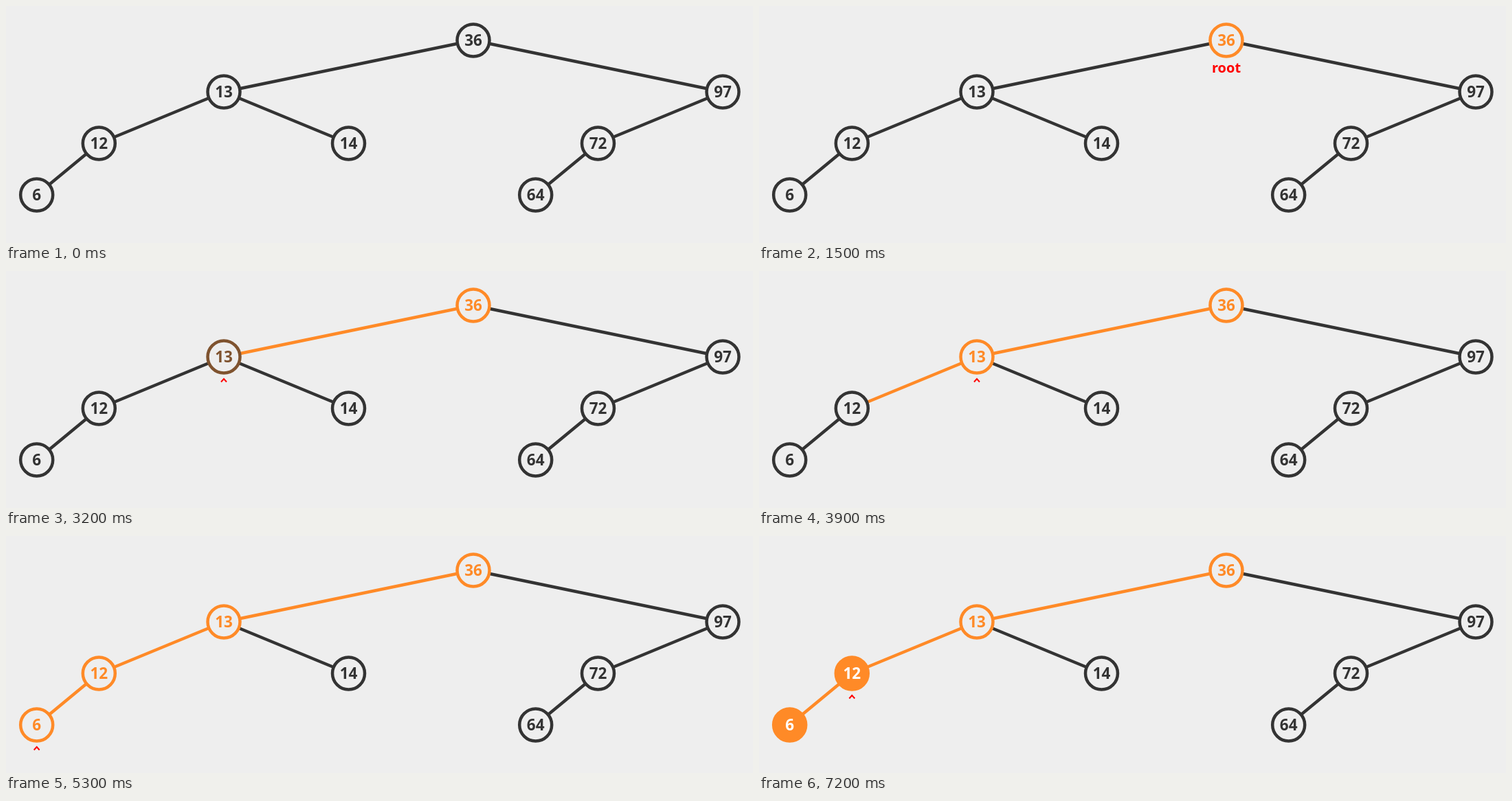
These frames come from a looping animation (1087x345 px, 8 s). An HTML page with a canvas:

```html
<!DOCTYPE html>
<html lang="en">
<head>
<meta charset="utf-8">
<title>Binary search tree traversal</title>
<style>
  html, body { margin: 0; width: 100%; height: 100%; overflow: hidden; background: #eee; }
  canvas { display: block; }
</style>
</head>
<body>
<canvas id="stage" width="1087" height="345"></canvas>
<script>
const ctx = document.getElementById('stage').getContext('2d');
const LOOP = 8000, FADE = 400, RADIUS = 23.5;
const PAPER = [238, 238, 238], INK = [51, 51, 51], ORANGE = [255, 138, 39], WHITE = [255, 255, 255];

// lit: outline turns orange; filled: disc turns solid
const nodes = {
  36: { x: 680, y: 50, lit: 1120 },
  13: { x: 317, y: 125, lit: 3020 },
  97: { x: 1043, y: 125 },
  12: { x: 135.3, y: 200, lit: 3990, filled: 6770 },
  14: { x: 498.5, y: 200 },
  72: { x: 861.5, y: 200 },
  6: { x: 44.7, y: 275, lit: 4910, filled: 5420 },
  64: { x: 770.7, y: 275 }
};
const edges = [
  [36, 13, 2544], [36, 97], [13, 12, 3500], [13, 14],
  [97, 72], [12, 6, 4420], [72, 64]
];
// Where the caret sits from each time on
const caretStops = [[2100, 36], [3020, 13], [3990, 12], [4910, 6], [6770, 12]];

function progress(time, start = Infinity) {
  const p = Math.min(1, Math.max(0, (time - start) / FADE));
  return p < 0.5 ? 4 * p ** 3 : 1 - 4 * (1 - p) ** 3;
}

const mix = (from, to, p) => `rgb(${from.map((c, i) => Math.round(c + (to[i] - c) * p))})`;
const rgb = color => mix(color, color, 0);

function line(points, width, color) {
  ctx.beginPath();
  points.forEach(([x, y]) => ctx.lineTo(x, y));
  ctx.lineWidth = width;
  ctx.strokeStyle = color;
  ctx.stroke();
}

function label(text, x, baseline, size, color) {
  ctx.font = `bold ${size}px "Open Sans", "Noto Sans", sans-serif`;
  ctx.fillStyle = color;
  ctx.fillText(text, x, baseline);
}

function drawEdge(time, [from, to, start]) {
  const a = nodes[from], b = nodes[to];
  const length = Math.hypot(b.x - a.x, b.y - a.y);
  const along = d => [a.x + (b.x - a.x) * d / length, a.y + (b.y - a.y) * d / length];
  const p = progress(time, start);
  line([along(RADIUS), along(length - RADIUS)], 4.5, rgb(p === 1 ? ORANGE : INK));
  if (p > 0 && p < 1) {
    line([along(RADIUS), along(RADIUS + (length - 2 * RADIUS) * p)], 15, rgb(ORANGE));
  }
}

function drawNode(time, value, { x, y, lit, filled }) {
  const litness = progress(time, lit), fullness = progress(time, filled);
  ctx.beginPath();
  ctx.arc(x, y, RADIUS, 0, 2 * Math.PI);
  ctx.fillStyle = mix(PAPER, ORANGE, fullness);
  ctx.fill();
  ctx.lineWidth = 4.5;
  ctx.strokeStyle = mix(INK, ORANGE, litness);
  ctx.stroke();
  label(value, x, y + 8, 22.5, fullness ? mix(ORANGE, WHITE, fullness) : mix(INK, ORANGE, litness));
}

function drawMarker(time) {
  if (time >= 1120 && time < 2100) label('root', 680, 97, 20, '#f00');
  const stop = caretStops.filter(([start]) => time >= start).pop();
  if (!stop) return;
  const { x, y } = nodes[stop[1]];
  line([[x - 4, y + 36.5], [x, y + 32], [x + 4, y + 36.5]], 2, '#f00');
}

function draw(time) {
  ctx.fillStyle = rgb(PAPER);
  ctx.fillRect(0, 0, 1087, 345);
  edges.forEach(edge => drawEdge(time, edge));
  Object.entries(nodes).forEach(([value, node]) => drawNode(time, value, node));
  drawMarker(time);
}

ctx.textAlign = 'center';
const began = performance.now();
function tick() {
  draw((performance.now() - began) % LOOP);
  requestAnimationFrame(tick);
}
tick();
</script>
</body>
</html>
```
